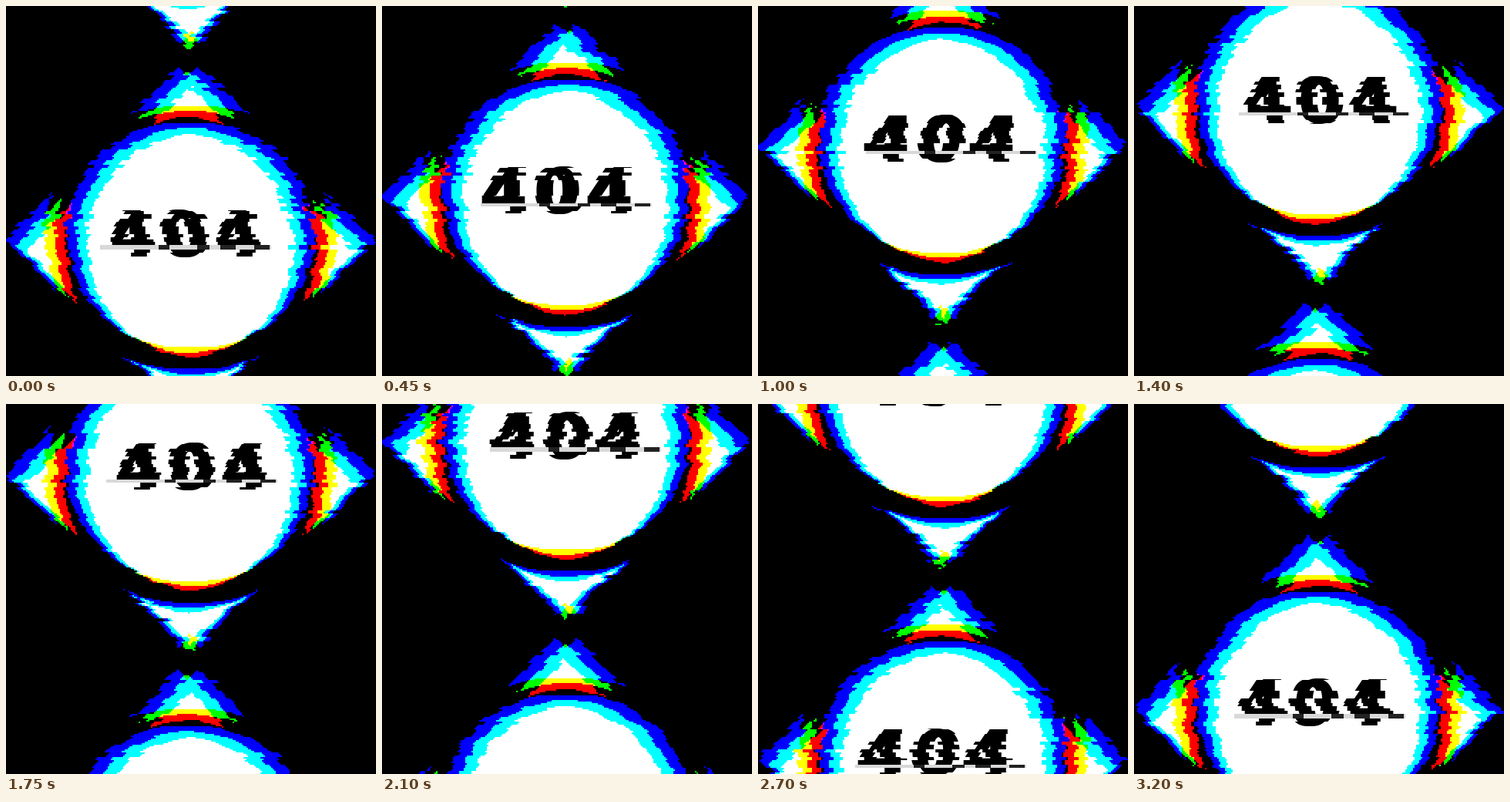
An HTML page with a canvas that plays this animation: 480 by 480 pixels, repeating every 3250 ms.

```html
<!DOCTYPE html>
<html lang="en">
<head>
<meta charset="utf-8">
<title>404</title>
<style>
  html, body { margin: 0; width: 100%; height: 100%; overflow: hidden; background: #000; }
  canvas { display: block; width: 480px; height: 480px; }
</style>
</head>
<body>
<canvas id="stage" width="480" height="480"></canvas>
<script>
const SIZE = 480, STEP = 50, STEPS = 65, ROW = 2, CENTER = 239;
const ctx = document.getElementById('stage').getContext('2d');

// step, upward scroll, text centre
const PATH = [
  [0, 0, 231], [9, 55.5, 230], [20, 123, 238], [28, 173, 239],
  [42, 254, 241], [54, 323, 229], [64, 388, 234]
];

// Colour channels: mirrored sideways spread and vertical shift
const CHANNELS = [
  { color: '#f00', spread: -13, shift: 7 },
  { color: '#0f0', spread: 0, shift: 0 },
  { color: '#00f', spread: 13, shift: -7 }
];
const DIAMOND = { y: 310, r: 226 };
const DISC = { y: 303, r: 146 };
const GAP = { y: 306, r: 171, stretch: 1.02 };

const TEXT = { top: 260, baseline: 325, height: 70, pitch: 68.5, tear: 312 };
const label = document.createElement('canvas');
label.width = SIZE;
label.height = TEXT.height;
const pen = label.getContext('2d');
pen.font = 'bold 82px "DejaVu Sans", sans-serif';
pen.textAlign = 'center';
for (const smear of [-3, 3]) {
  [...'404'].forEach((digit, i) =>
    pen.fillText(digit, SIZE / 2 + (i - 1) * TEXT.pitch + smear, TEXT.baseline - TEXT.top));
}

const mod = (a, n) => ((a % n) + n) % n;
const snap = x => Math.round(x / 2) * 2;

// Repeatable noise in -1..1
function noise(a, b) {
  const v = Math.sin(a * 127.1 + b * 311.7) * 43758.5453;
  return (v - Math.floor(v)) * 2 - 1;
}

function along(step, column) {
  const i = Math.max(1, PATH.findIndex(p => p[0] >= step));
  const a = PATH[i - 1], b = PATH[i];
  return a[column] + (b[column] - a[column]) * (step - a[0]) / (b[0] - a[0]);
}

function halfChord(shape, y) {
  const dy = y - shape.y;
  return Math.abs(dy) < shape.r ? Math.sqrt(shape.r ** 2 - dy * dy) : 0;
}

// Straight sides, hollowed a little towards the lower tip
function halfDiamond(y) {
  const tip = DIAMOND.y + DIAMOND.r;
  const t = Math.min(1, Math.max(0, (y - 460) / (tip - 460)));
  return DIAMOND.r - Math.abs(y - DIAMOND.y) - 8 * Math.sin(Math.PI * t);
}

function mirrored(y, x, from, to) {
  from = Math.max(0, from);
  if (to <= from) return;
  const left = snap(x - to), leftEnd = snap(x - from);
  const right = snap(x + from), rightEnd = snap(x + to);
  ctx.fillRect(left, y, leftEnd - left, ROW);
  ctx.fillRect(right, y, rightEnd - right, ROW);
}

function drawShape(screenY, imageY, x, swell) {
  for (const { color, spread, shift } of CHANNELS) {
    const y = imageY - shift, s = spread + swell;
    const disc = halfChord(DISC, y);
    const gap = halfChord(GAP, y) * GAP.stretch;
    const diamond = halfDiamond(y);
    ctx.fillStyle = color;
    if (disc > 0) mirrored(screenY, x, 0, disc + s);
    if (gap > 0) {
      if (diamond > gap) mirrored(screenY, x, gap + s, diamond + s);
    } else if (diamond > 0) {
      mirrored(screenY, x, spread - diamond, diamond + s);
    }
  }
}

function drawText(screenY, imageY, x) {
  const row = imageY - TEXT.top;
  if (row < 0 || row > TEXT.height - ROW) return;
  if (Math.abs(imageY - TEXT.tear) < 2.5) {
    ctx.fillStyle = '#d8d8d8';
    ctx.fillRect(x - 104, screenY, 222, ROW);
    ctx.fillStyle = '#222';
    for (const [from, width] of [[-28, 14], [22, 16], [52, 20], [96, 20]]) {
      ctx.fillRect(x + from, screenY, width, ROW);
    }
    return;
  }
  ctx.drawImage(label, 0, Math.round(row), SIZE, ROW, x - SIZE / 2, screenY, SIZE, ROW);
}

function draw(step) {
  const scroll = along(step, 1), textX = along(step, 2);
  ctx.globalCompositeOperation = 'source-over';
  ctx.fillStyle = '#000';
  ctx.fillRect(0, 0, SIZE, SIZE);

  for (let y = 0; y < SIZE; y += ROW) {
    const imageY = mod(y + scroll - 60, SIZE) + 60;
    const band = Math.floor(imageY / 5);
    const strength = imageY > 335 && imageY < 445 ? 0.5 : 1;
    const slide = noise(band, step + 1) * 5 * strength;
    const swell = noise(band + 200, step + 7) * 3 * strength;
    ctx.globalCompositeOperation = 'lighter';
    drawShape(y, imageY, CENTER + slide, swell);
    ctx.globalCompositeOperation = 'source-over';
    drawText(y, imageY, snap(textX + slide * 1.3));
  }
}

let start, shown;
function tick(now) {
  start ??= now;
  const step = Math.floor((now - start) / STEP) % STEPS;
  if (step !== shown) draw(shown = step);
  requestAnimationFrame(tick);
}

draw(0);
requestAnimationFrame(tick);
</script>
</body>
</html>
```
